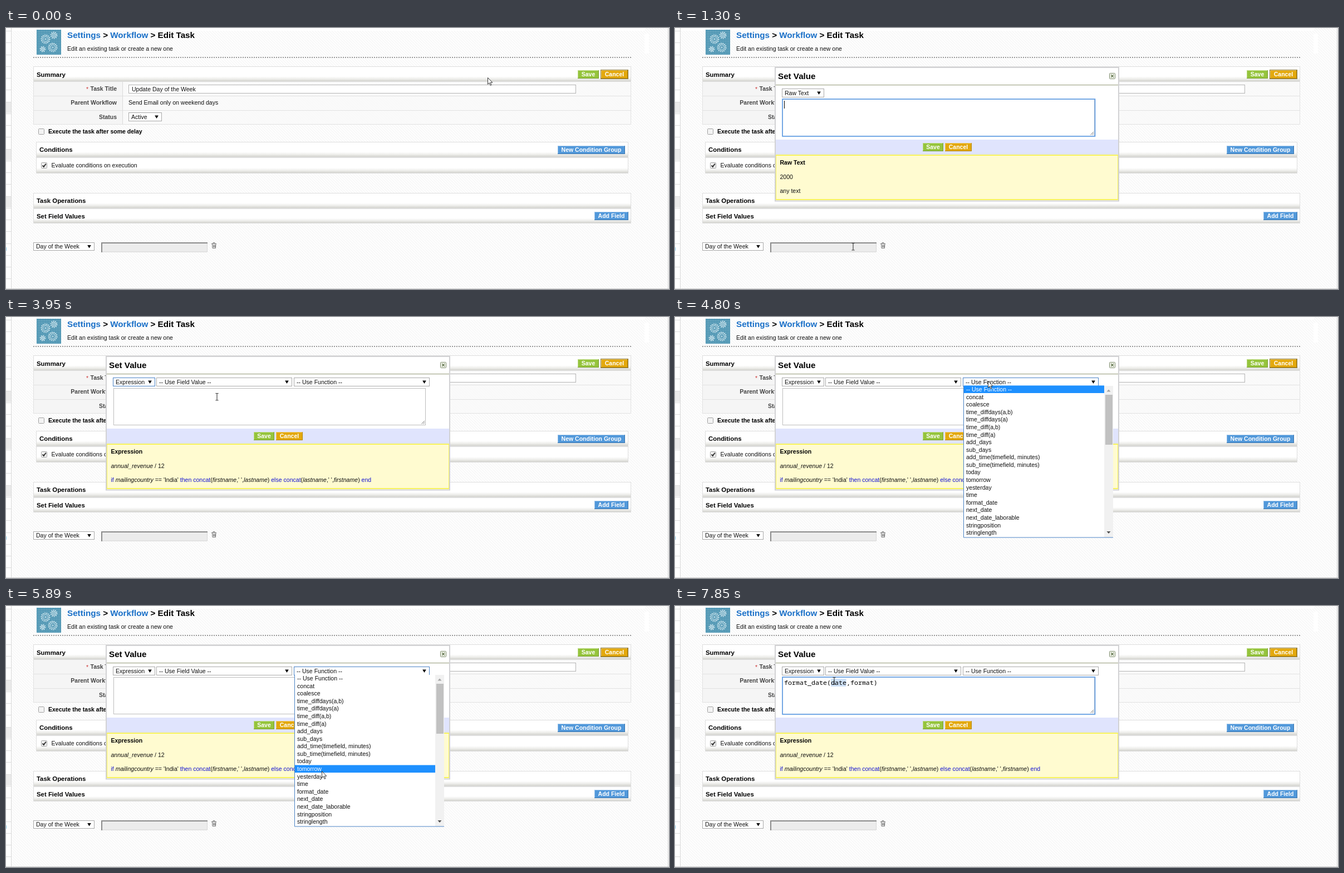
Recreate the animation shown at these times as an HTML page. Size 1191 by 470 pixels, loop 8000 ms.

```html
<!DOCTYPE html>
<html lang="en">
<head>
<meta charset="utf-8">
<title>Edit Task</title>
<style>
html, body { margin: 0; width: 100%; height: 100%; overflow: hidden; background: #fcfcfc; }
svg { display: block; }
text { font: 10.55px "Liberation Sans", Arial, sans-serif; fill: #111; white-space: pre; }
.b { font-weight: bold; font-size: 10.5px; fill: #000; }
.lab { font-weight: bold; font-size: 10.5px; fill: #444; text-anchor: end; }
.h { font-weight: bold; font-size: 11.4px; fill: #000; }
.t { font-weight: bold; font-size: 15.2px; fill: #000; }
.btn { font-weight: bold; font-size: 10.5px; fill: #fff; text-anchor: middle; }
.code { font: 11.67px "Noto Sans Mono", "DejaVu Sans Mono", monospace; fill: #000; }
.kw { fill: #1414d2; }
.link { fill: #1a70c8; }
i, .i { font-style: italic; }
.on { fill: #fff; }
</style>
</head>
<body>
<svg id="stage" width="1191" height="470" viewBox="0 0 1191 470"></svg>
<script>
const LOOP = 8000, ROW = 13.59, TOP = 123.4;
const MODES = ['Raw Text', 'Field', 'Expression'];
const FUNCS = ['-- Use Function --', 'concat', 'coalesce', 'time_diffdays(a,b)', 'time_diffdays(a)',
  'time_diff(a,b)', 'time_diff(a)', 'add_days', 'sub_days', 'add_time(timefield, minutes)',
  'sub_time(timefield, minutes)', 'today', 'tomorrow', 'yesterday', 'time', 'format_date',
  'next_date', 'next_date_laborable', 'stringposition', 'stringlength'];

// drawing helpers
const rect = (x, y, w, h, fill, extra = '') =>
  `<rect x="${x}" y="${y}" width="${w}" height="${h}" fill="${fill}" ${extra}/>`;
const box = (x, y, w, h, fill, line, extra = '') =>
  rect(x + .5, y + .5, w - 1, h - 1, fill, `stroke="${line}" ${extra}`);
const path = (d, line, extra = '') => `<path d="${d}" fill="none" stroke="${line}" ${extra}/>`;
// text is placed by the middle of its line
const text = (x, mid, s, cls = '', extra = '') =>
  `<text x="${x}" y="${mid + (cls === 't' ? 5.4 : cls === 'h' ? 4.1 : 3.8)}" class="${cls}" ${extra}>${s}</text>`;
const group = (id, body) => `<g id="${id}">${body}</g>`;
const tri = (x, y) => `<path d="M${x - 3.3} ${y - 2.6}h6.6l-3.3 5.6z" fill="#000"/>`;

const bar = (x, y, w, h) => box(x, y, w, h, 'url(#bar)', '#dedede');
const button = (x, y, w, h, fill, dark, s) =>
  rect(x, y, w, h, fill) +
  path(`M${x + .5} ${y + h}V${y + .5}H${x + w}`, '#fff', 'stroke-opacity=".4"') +
  path(`M${x} ${y + h - .5}H${x + w - .5}V${y}`, dark) +
  text(x + w / 2, y + h / 2, s, 'btn');
const green = (x, y, w) => button(x, y, w, 15, '#95c43c', '#789f30', 'Save');
const select = (x, y, w, h, s, id = '') =>
  box(x, y, w, h, '#fff', '#a9a9a9', id && `id="${id}"`) +
  text(x + 5, y + h / 2, s, '', id && `id="${id}Text"`) + tri(x + w - 9.5, y + h / 2);
const list = (items, x) => items.map((s, k) => text(x, 130.2 + k * ROW, s)).join('');

const gear = (x, y, r) =>
  `<g fill="none" stroke="#cfe6ee"><circle cx="${x}" cy="${y}" r="${r}" stroke-width="3" stroke-dasharray="1.6 1.5"/>` +
  `<circle cx="${x}" cy="${y}" r="${r * .62}"/><circle cx="${x}" cy="${y}" r="1.2"/></g>`;

const defs = `<defs>
  <pattern id="hatch" width="5" height="5" patternUnits="userSpaceOnUse">
    <rect width="5" height="5" fill="#fdfdfd"/><path d="M-1 -1L6 6M-1 4L1 6M4 -1L6 1" stroke="#f3f3f3"/></pattern>
  <pattern id="mesh" width="3" height="3" patternUnits="userSpaceOnUse">
    <rect width="3" height="3" fill="#5197b4"/><rect width="1" height="1" fill="#9cc8d8"/></pattern>
  <linearGradient id="bar" x2="0" y2="1"><stop offset=".66" stop-color="#fff"/>
    <stop offset=".84" stop-color="#ecece9"/><stop offset="1" stop-color="#cfcfca"/></linearGradient>
  <clipPath id="icon"><rect x="55" y="3" width="44" height="45"/></clipPath></defs>`;

function sidebar() {
  let s = rect(0, 0, 9, 470, '#fff');
  for (const y of [133, 218, 303]) s += rect(0, y, 9, 20, '#ebebeb');
  for (let k = 0; k < 22; k++) s += rect(0, Math.round(5 + k * 21.25), 9, 1, '#dcdcdc');
  return s + rect(9, 0, 1, 470, '#d8d8d8') + rect(0, 395, 1, 6, '#8fd0ee');
}

function page() {
  const label = (y, s) => text(199, y, s, 'lab');
  return rect(0, 0, 1191, 470, 'url(#hatch)') + rect(10, 0, 1138, 5, '#fff') + rect(1147, 10, 8, 36, '#fff') +
    sidebar() + rect(1189, 0, 1, 470, '#d2d2d2') + rect(0, 469, 1191, 1, '#cfcfcf') +
    `<g clip-path="url(#icon)">${rect(55, 3, 44, 45, 'url(#mesh)')}${gear(71, 20, 7)}${gear(86, 13, 5)}${gear(84, 35, 7)}${gear(66, 38, 4)}</g>` +
    text(110, 13, '<tspan class="link">Settings</tspan> &gt; <tspan class="link">Workflow</tspan> &gt; Edit Task', 't') +
    text(110, 37, 'Edit an existing task or create a new one') +
    path('M49 53H1123', '#999', 'stroke-width="2" stroke-dasharray="2 2"') +
    // summary
    rect(49, 97, 1074, 76, '#fafafa', 'fill-opacity=".75"') + rect(49, 97, 160, 76, '#f5f5f5') +
    path('M49.5 97V173.5H1122.5V97M49 122.5H1123M49 148.5H1123', '#e2e2e2') + rect(209, 97, 1, 76, '#dadada') +
    bar(49, 69, 1074, 28) + text(55, 83.5, 'Summary', 'h') + green(1027, 76, 38) +
    box(1068, 75, 50, 17, '#fff', '#8d7a3c') + button(1069, 76, 48, 15, '#e3a80c', '#b3850a', 'Cancel') +
    text(144, 110.5, '*', '', 'fill="#c33" style="fill:#c33"') + label(109.5, 'Task Title') +
    label(134.5, 'Parent Workflow') + label(160, 'Status') +
    box(220, 102, 804, 16, '#fff', '#b4b4b4') + text(226, 110, 'Update Day of the Week') +
    text(220, 134.5, 'Send Email only on weekend days') + select(220, 152, 60, 16, 'Active') +
    box(58, 181, 11, 11, '#f3f3f3', '#a0a0a0', 'rx="1"') + text(76, 186.5, 'Execute the task after some delay', 'b') +
    // conditions
    bar(54, 205, 1064, 28) + bar(54, 233, 1064, 29) + text(60, 219, 'Conditions', 'h') +
    button(991, 212, 121, 15, '#5198da', '#3b74ab', 'New Condition Group') +
    box(63, 242, 11, 11, '#f3f3f3', '#a0a0a0', 'rx="1"') + path('M65.5 247.5l2.3 2.4 4-5.4', '#333', 'stroke-width="2"') +
    text(81.5, 247, 'Evaluate conditions on execution') +
    // operations
    bar(49, 297, 1074, 28) + bar(49, 325, 1074, 27) + text(55, 311, 'Task Operations', 'h') +
    text(55, 338.5, 'Set Field Values', 'h') + button(1057, 331, 61, 15, '#5198da', '#3b74ab', 'Add Field') +
    select(49, 386, 110, 15, 'Day of the Week') +
    rect(171, 386, 191, 18, '#ececec') + path('M172 404V387H362', '#8b8b8b', 'stroke-width="2"') +
    path('M173 403H361.5V388', '#d8d8d8') +
    path('M369 388.5H378M372 388V386.5H375V388M370.5 389L371 396.5H376.5L377 389M372.5 390.5V395M374 390.5V395M375.5 390.5V395', '#777');
}

function modal() {
  const it = s => `<tspan class="i">${s}</tspan>`, kw = s => `<tspan class="kw">${s}</tspan>`;
  return rect(179, 70, 619, 242, '#fff') +
    text(185, 86.5, 'Set Value', 't') + rect(180, 102, 617, 1.2, '#a3a88a') +
    box(780, 81, 11, 11, '#f4f7ee', '#7d8b6c', 'rx="1"') + path('M783 84l5 5M788 84l-5 5', '#5d7048', 'stroke-width="1.3"') +
    rect(180, 201, 617, 27, '#e0e4fd') + green(445, 207, 37) + button(485, 207, 48, 15, '#e3a80c', '#b3850a', 'Cancel') +
    rect(181, 229, 615, 80, '#fffbd0', 'stroke="#f7f25c" stroke-width="2"') +
    rect(180, 71, 617, 240.5, 'none', 'stroke="#d2d2d4" stroke-width="2"') +
    box(193, 128, 561, 67, '#fff', '#bdbdbd') +
    rect(193, 128, 561.5, 67, 'none', 'id="areaFocus" stroke="#5b9be6" stroke-width="1.6"') +
    path('M746.5 192.5l5.5-5.5M749.5 192.5l2.5-2.5', '#777') +
    select(192, 109, 76, 16, 'Raw Text', 'mode') +
    group('rawHelp', text(188.5, 242.5, 'Raw Text', 'b') + text(188.5, 268, '2000') + text(188.5, 293, 'any text')) +
    group('exprHelp', select(270, 109, 244, 16, '-- Use Field Value --') +
      select(517, 109, 244, 16, '-- Use Function --', 'func') +
      text(188.5, 242.5, 'Expression', 'b') + text(188.5, 268, it('annual_revenue') + ' / 12') +
      text(188.5, 293, kw('if') + ' ' + it('mailingcountry') + " == 'India' " + kw('then concat') + '(' + it('firstname') +
        ",' '," + it('lastname') + ') ' + kw('else concat') + '(' + it('lastname') + ",' '," + it('firstname') + ') ' + kw('end'))) +
    rect(280, 131, 27.5, 14, '#cfe2f8', 'id="pick"') +
    text(196, 138, 'format_date(date,format)', 'code', 'id="code"') +
    rect(0, 131, 1, 14, '#000', 'id="caret"') +
    group('modeList', rect(193, 124, 74.5, 42, '#fff') + rect(194, TOP, 73.5, ROW, '#1e90ff', 'id="modeBar"') +
      list(MODES, 198) + path('M193.5 124V165.5H267.5', '#2f5f9e')) +
    group('funcList', rect(518, 124, 269, 274, '#fff') + rect(519, TOP, 252, ROW, '#1e90ff', 'id="funcBar"') +
      list(FUNCS, 523) + rect(771, 124, 16, 273, '#f1f1f1') + rect(773, 140, 13, 90, '#c1c1c1') +
      '<path d="M775.5 134.5h7l-3.5-4z" fill="#a3a3a3"/><path d="M775.5 386h7l-3.5 4z" fill="#505050"/>' +
      path('M518.5 124V397H787', '#4a82c4'));
}

const pointer = group('arrow', '<path d="M.5 .5V12.3L3.2 9.8L5.2 14.4L7 13.6L5.1 9.2H8.8Z" fill="#fff" stroke="#222" stroke-width=".9"/>') +
  group('beam', path('M-2.5 -6.5H-.7L0 -6L.7 -6.5H2.5M0 -6V5.5M-2.5 6H-.7L0 5.5L.7 6H2.5', '#222'));

document.getElementById('stage').innerHTML = defs + page() + group('modal', modal()) + pointer;
const $ = id => document.getElementById(id);
const show = (id, on) => { $(id).style.display = on ? '' : 'none'; };

// pointer moves: start, end, steps, x, y
const MOVES = [
  [150, 920, 11, 321, 393], [990, 1070, 2, 320, 394], [1770, 2530, 11, 234, 121],
  [2930, 3090, 3, 236, 157], [3580, 4340, 11, 566, 126], [4420, 4650, 4, 562, 115],
  [5200, 5890, 10, 567, 297], [5970, 5970, 1, 568, 306], [6050, 6270, 4, 560, 331],
  [6440, 6440, 1, 559, 332], [6748, 7290, 8, 286, 135]];

function pointerAt(t) {
  let x = 865, y = 89;
  for (const [a, b, n, tx, ty] of MOVES) {
    if (t < a) break;
    const i = n > 1 ? Math.min(n, Math.floor((t - a) * (n - 1) / (b - a) + 1.05)) : 1;
    const f = i / n, k = f * f * (3 - 2 * f);
    x += (tx - x) * k;
    y += (ty - y) * k;
  }
  return [x, y];
}

function hover(listId, barId, y) {
  const rows = $(listId).querySelectorAll('text');
  const k = Math.max(0, Math.min(rows.length - 1, Math.floor((y - TOP) / ROW)));
  $(barId).setAttribute('y', TOP + k * ROW);
  rows.forEach((r, i) => r.setAttribute('class', i === k ? 'on' : ''));
}

function caretAt(t) {
  if (t < 2630) return (t - 1300) % 1000 < 500 ? 196 : 0;
  if (t >= 6670 && t < 7170) return 363;
  return t >= 7600 && t < 7850 ? 286 : 0;
}

function draw(t) {
  const [x, y] = pointerAt(t);
  const open = t >= 1300, expr = t >= 3580, typed = t >= 6670;
  const modeOpen = t >= 2707 && t < 3170, funcOpen = t >= 4800 && !typed;
  show('modal', open);
  show('rawHelp', !expr);
  show('exprHelp', expr);
  show('modeList', modeOpen);
  show('funcList', funcOpen);
  show('code', typed);
  show('pick', t >= 7850);
  show('areaFocus', t < 2630 || typed);
  $('modeText').textContent = t < 3170 ? MODES[0] : MODES[2];
  $('mode').setAttribute('stroke', t >= 2630 && t < 4800 ? '#4a82c4' : '#a9a9a9');
  $('func').setAttribute('stroke', funcOpen ? '#4a82c4' : '#a9a9a9');
  const caret = caretAt(t);
  show('caret', caret > 0);
  $('caret').setAttribute('x', caret);
  hover('modeList', 'modeBar', y);
  hover('funcList', 'funcBar', y);

  const inField = x > 171 && x < 362 && y > 386 && y < 404;
  const inArea = open && !modeOpen && !funcOpen && (t < 3170 || expr) && x > 193 && x < 754 && y > 128 && y < 194;
  const beam = inField || inArea;
  show('beam', beam);
  show('arrow', !beam);
  $(beam ? 'beam' : 'arrow').setAttribute('transform', `translate(${Math.round(x)} ${Math.round(y)})`);
}

const start = performance.now();
function tick() {
  draw((performance.now() - start) % LOOP);
  requestAnimationFrame(tick);
}
tick();
</script>
</body>
</html>
```
